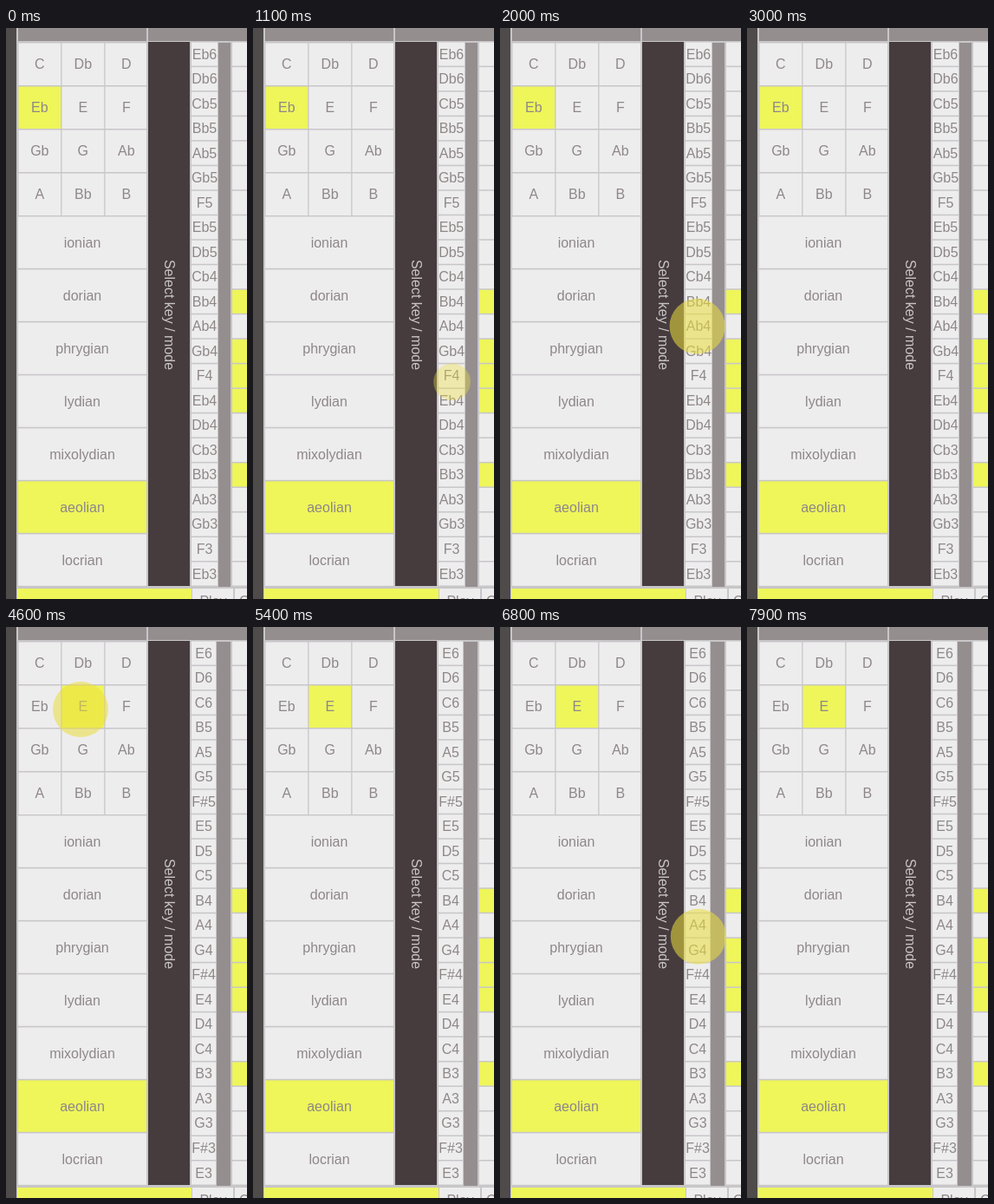
These frames come from a looping animation (278x658 px, 8000 ms). An HTML page:

```html
<!DOCTYPE html>
<html lang="en">
<head>
<meta charset="utf-8">
<title>Key and mode selector</title>
<style>
html, body { margin: 0; width: 100%; height: 100%; overflow: hidden; background: #c8c6c8; }
svg { display: block; font: 16px "Liberation Sans", Arial, sans-serif; fill: #8e8788; text-anchor: middle; }
</style>
</head>
<body>
<svg id="stage" width="278" height="658" viewBox="0 0 278 658"></svg>
<script>
const LOOP = 8000, STEP = 100, KEY_CHANGE = 4450, FADE = 300;
const LINE = '#c8c6c8', CELL = '#eeedee', YELLOW = '#eef65a', GREY = '#958e8f', DARK = '#463c3e';
const stage = document.getElementById('stage');

function add(tag, attrs, parent = stage) {
  const node = document.createElementNS('http://www.w3.org/2000/svg', tag);
  for (const [name, value] of Object.entries(attrs)) node.setAttribute(name, value);
  parent.append(node);
  return node;
}
const rect = (x, y, width, height, fill, parent) => add('rect', { x, y, width, height, fill }, parent);
function label(text, x, y, parent, attrs = {}) {
  add('text', { x, y, ...attrs }, parent).textContent = text;
}
function cell(text, x, y, w, h, fill, parent) {
  const box = rect(x, y, w, h, fill, parent);
  label(text, x + w / 2, Math.floor(y + h / 2 + 6), parent);
  return box;
}
const rowTop = i => 16.6 + 28.52 * i;

// Key and mode buttons
const keys = {};
'C Db D Eb E F Gb G Ab A Bb B'.split(' ').forEach((name, i) => {
  keys[name] = cell(name, 14.5 + 50 * (i % 3), 17.5 + 50 * Math.floor(i / 3), 48.7, 48.5, CELL);
});
'ionian dorian phrygian lydian mixolydian aeolian locrian'.split(' ').forEach((name, i) =>
  cell(name, 14, 217.4 + 61 * i, 148, 59.4, name === 'aeolian' ? YELLOW : CELL));

// Frame of the page
rect(0, 0, 12, 658, '#4e4b4a');
rect(14, 0, 264, 15, GREY);
rect(162, 0, 2, 645, LINE);
rect(164, 16, 48, 627, DARK);
label('Select key / mode', 0, 0, stage, { transform: 'translate(183 330.5) rotate(90)', fill: '#c9c4c5' });

// Bottom row
rect(13, 646, 201, 12, YELLOW);
rect(215, 646, 47, 12, CELL);
rect(264, 646, 14, 12, CELL);
label('Play', 239, 666);
label('Clear', 288, 666);

function noteList(names, litNotes, width) {
  const group = add('g', {});
  const lit = litNotes.split(' ');
  rect(width + 215, 17, 44 - width, 627, GREY, group);
  names.split(' ').forEach((name, i) => {
    cell(name, 214, rowTop(i), width, 27, CELL, group);
    rect(261, rowTop(i), 17, 27, lit.includes(name) ? YELLOW : CELL, group);
  });
  return group;
}
const lists = {
  Eb: noteList('Eb6 Db6 Cb5 Bb5 Ab5 Gb5 F5 Eb5 Db5 Cb4 Bb4 Ab4 Gb4 F4 Eb4 Db4 Cb3 Bb3 Ab3 Gb3 F3 Eb3',
    'Bb4 Gb4 F4 Eb4 Bb3', 30),
  E: noteList('E6 D6 C6 B5 A5 G5 F#5 E5 D5 C5 B4 A4 G4 F#4 E4 D4 C4 B3 A3 G3 F#3 E3',
    'B4 G4 F#4 E4 B3', 28)
};

// Touch highlights glide from one point to another, growing in and shrinking out
const touches = [
  { start: 900, end: 2700, from: [230, 422], to: [226, 294] },
  { start: 4300, end: 5000, from: [86, 95], to: [86, 95] },
  { start: 5750, end: 7500, from: [224, 280], to: [232, 408] }
];
for (const touch of touches) touch.node = add('circle', { fill: '#ebdf3c' });

function drawTouch({ node, start, end, from, to }, time) {
  const grow = Math.max(0, Math.min(1, (time - start) / FADE, (end - time) / FADE));
  const progress = (time - start) / (end - start);
  const [cx, cy] = from.map((value, i) => value + (to[i] - value) * progress);
  for (const [name, value] of Object.entries({ cx, cy, r: 32 * grow, opacity: .55 * grow }))
    node.setAttribute(name, value);
}

function draw(now) {
  const time = Math.floor(now % LOOP / STEP) * STEP;
  const selected = time < KEY_CHANGE ? 'Eb' : 'E';
  for (const name in lists) {
    keys[name].setAttribute('fill', name === selected ? YELLOW : CELL);
    lists[name].style.display = name === selected ? '' : 'none';
  }
  touches.forEach(touch => drawTouch(touch, time));
}

const begin = performance.now();
function tick() {
  draw(performance.now() - begin);
  requestAnimationFrame(tick);
}
tick();
</script>
</body>
</html>
```
